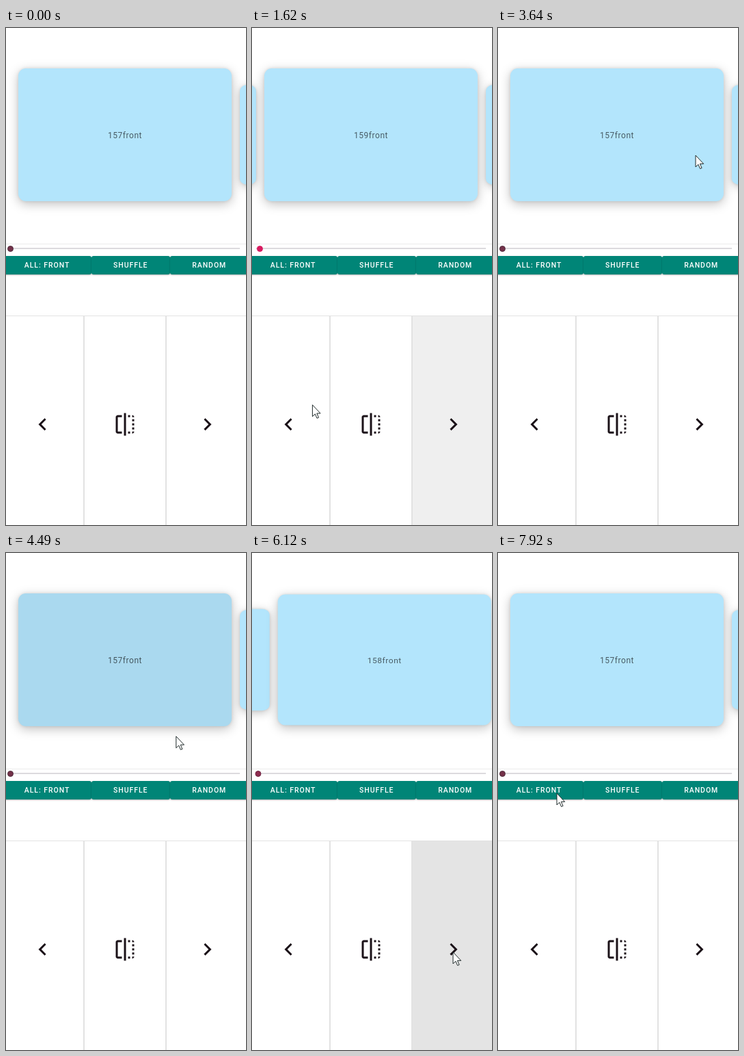
Write an HTML page that moves like this. It is 351 px wide and 726 px high and loops after 8000 ms.

```html
<!DOCTYPE html>
<html lang="en">
<head>
<meta charset="utf-8">
<title>Flash cards</title>
<style>
  html, body { margin: 0; width: 100%; height: 100%; overflow: hidden; background: #fff; }
  #stage { position: relative; width: 351px; height: 726px; overflow: hidden; background: #fff; font-family: Roboto, sans-serif; }
  #stage * { position: absolute; box-sizing: border-box; }
  .card {
    left: 18px; top: 59px; width: 312px; height: 194px; border-radius: 11px;
    background: #b3e5fc; box-shadow: 0 4px 16px rgba(0, 0, 0, .25), 0 0 4px rgba(0, 0, 0, .1);
  }
  .label {
    inset: 0; line-height: 196px; text-align: center; font-size: 12px;
    letter-spacing: .045em; color: rgba(0, 0, 0, .6);
  }
  .clip { inset: 0; overflow: hidden; border-radius: inherit; }
  .ripple { border-radius: 50%; background: #000; }
  .line { background: #e2e2e2; }
  .button {
    top: 333px; height: 27px; border-radius: 3px; background: #008577; color: #fff;
    font-size: 10.5px; font-weight: 500; line-height: 28px; text-align: center;
    letter-spacing: .0893em; box-shadow: 0 1px 2px rgba(0, 0, 0, .3);
  }
  .cell { top: 421px; height: 305px; overflow: hidden; }
  #thumb { left: 2px; top: 317.5px; width: 9px; height: 9px; border-radius: 50%; border: 1px solid #4d2c3c; }
  svg { left: 0; top: 0; overflow: visible; }
</style>
</head>
<body>
<div id="stage">
  <div id="cards"></div>
  <div class="line" style="left:0;top:315px;width:351px;height:1px;background:#ececec"></div>
  <div class="line" style="left:6px;top:321px;width:336px;height:2px;background:#dcdade"></div>
  <div id="thumb"></div>
  <div class="button" style="left:-5px;width:130px">ALL: FRONT</div>
  <div class="button" style="left:125px;width:114.5px">SHUFFLE</div>
  <div class="button" style="left:239.5px;width:115.5px">RANDOM</div>
  <div class="line" style="left:0;top:420px;width:351px;height:1px"></div>
  <div class="cell" id="prev" style="left:0;width:113px"></div>
  <div class="cell" id="flip" style="left:115px;width:119px"></div>
  <div class="cell" id="next" style="left:234px;width:117px"></div>
  <div class="line" style="left:112.5px;top:421px;width:2.5px;height:305px"></div>
  <div class="line" style="left:232.7px;top:421px;width:2.5px;height:305px"></div>
  <svg width="351" height="726" fill="#1b1218">
    <path transform="translate(35.5 561) scale(1.5)" d="M15.41 7.41 14 6l-6 6 6 6 1.41-1.41L10.83 12z"/>
    <path transform="translate(156 561) scale(1.5)" d="M15 21h2v-2h-2zM19 9h2V7h-2zM3 5v14c0 1.1.9 2 2 2h4v-2H5V5h4V3H5c-1.1 0-2 .9-2 2zM19 3v2h2c0-1.1-.9-2-2-2zM11 23h2V1h-2zM19 17h2v-2h-2zM15 5h2V3h-2zM19 13h2v-2h-2zM19 21c1.1 0 2-.9 2-2h-2z"/>
    <path transform="translate(276.5 561) scale(1.5)" d="M10 6 8.59 7.41 13.17 12l-4.58 4.58L10 18l6-6z"/>
    <path id="cursor" fill="#fff" stroke="#1f2a2a" d="M0 0v17l3.9-3.7 2.7 6.2 2.5-1-2.7-6.1h5.3z"/>
  </svg>
</div>
<script>
const LOOP = 8000, PAGE = 324, FIRST = 157, REACTION = 50;
const $ = id => document.getElementById(id);
const clamp = x => Math.min(1, Math.max(0, x));
const mix = (a, b, p) => a + (b - a) * p;
const easeOut = x => 1 - (1 - x) ** 2;
const easeInOut = x => x * x * (3 - 2 * x);

// Pointer stops: arrival time, position, and what is done there
const stops = [
  [140, 242, 324],
  [290, 277, 659],
  [440, 277, 659, 'next'],
  [1240, 294, 588, 'next'],
  [1683, 58, 545],
  [2120, 110, 190, 'swipe'],
  [2400, 250, 192],
  [2620, 180, 185, 'swipe'],
  [2842, 289, 186],
  [3700, 262, 200, 'card'],
  [4090, 262, 200, 'card'],
  [4806, 190, 570],
  [4980, 190, 570, 'flip'],
  [5380, 190, 570, 'flip'],
  [5830, 294, 583, 'next'],
  [6785, 145, 586, 'flip'],
  [7000, 49, 568, 'prev'],
  [7535, 49, 568],
  [7540, 75, 375],
  [7920, 86, 351]
].map(([at, x, y, action]) => ({ at, x, y, action }));

// The pointer rests at a stop, then glides so as to reach the next one on time.
function pointerAt(t) {
  const i = stops.findIndex(s => s.at > t);
  if (i < 1) return i ? stops.at(-1) : stops[0];
  const a = stops[i - 1], b = stops[i];
  const travel = Math.min(b.at - a.at, 1.15 * Math.hypot(b.x - a.x, b.y - a.y));
  const p = travel && easeInOut(clamp(1 - (b.at - t) / travel));
  return { x: mix(a.x, b.x, p), y: mix(a.y, b.y, p) };
}

function add(parent, className) {
  const el = document.createElement('div');
  el.className = className;
  parent.append(el);
  return el;
}

const cards = [0, 1, 2, 3].map(index => {
  const el = add($('cards'), 'card');
  return { index, el, clip: add(el, 'clip'), label: add(el, 'label'), flips: [] };
});

const scrolls = [], ripples = [];

function addRipple({ at, x, y }, host) {
  const frame = host.getBoundingClientRect();
  ripples.push({
    at, x: x - frame.x, y: y - frame.y,
    w: frame.width, h: frame.height, el: add(host, 'ripple')
  });
}

let current = 0;
for (const stop of stops.filter(s => s.action)) {
  const { action } = stop, start = stop.at + REACTION;
  if (action !== 'swipe') addRipple(stop, action === 'card' ? cards[0].clip : $(action));
  if (action === 'card' || action === 'flip') {
    cards[current].flips.push(start);
  } else {
    const from = current;
    current += action === 'next' ? 1 : -1;
    const [duration, ease] = action === 'swipe' ? [450, easeInOut] : [320, easeOut];
    scrolls.push({ start, duration, ease, from, to: current });
  }
}

function pageAt(t) {
  const s = scrolls.findLast(s => s.start <= t);
  return s ? mix(s.from, s.to, s.ease(clamp((t - s.start) / s.duration))) : 0;
}

function drawRipple({ at, x, y, w, h, el }, t) {
  const age = t - at;
  const p = easeInOut(clamp(age / 200));
  const r = mix(Math.max(w, h) * .3, Math.hypot(w, h) / 2, p);
  Object.assign(el.style, {
    left: mix(x, w / 2, p) - r + 'px',
    top: mix(y, h / 2, p) - r + 'px',
    width: 2 * r + 'px',
    height: 2 * r + 'px',
    opacity: .106 * clamp(age / 75) * clamp((500 - age) / 200)
  });
}

function drawCard({ index, el, label, flips }, page, t) {
  const offset = index - page;
  const scale = 1 - .25 * Math.min(1, Math.abs(offset));
  el.style.transform = `translateX(${offset * PAGE}px) scaleY(${scale})`;
  const turns = flips.filter(time => time <= t).length;
  const text = FIRST + index + (turns % 2 ? 'back' : 'front');
  if (label.textContent !== text) label.textContent = text;
}

function render(t) {
  const page = pageAt(t), selected = Math.round(page);
  cards.forEach(card => drawCard(card, page, t));
  ripples.forEach(ripple => drawRipple(ripple, t));

  $('thumb').style.transform = `translateX(${selected * 2.5}px)`;
  const tint = `color-mix(in srgb, #d81b60 ${25 * selected ** 2}%, `;
  $('thumb').style.background = tint + '#743149)';
  $('thumb').style.borderColor = tint + '#4d2c3c)';

  const { x, y } = pointerAt(t);
  $('cursor').setAttribute('transform', `translate(${x} ${y})`);
  $('cursor').style.visibility = t < stops[0].at ? 'hidden' : 'visible';
}

const began = performance.now();
function tick() {
  render((performance.now() - began) % LOOP);
  requestAnimationFrame(tick);
}
tick();
</script>
</body>
</html>
```
